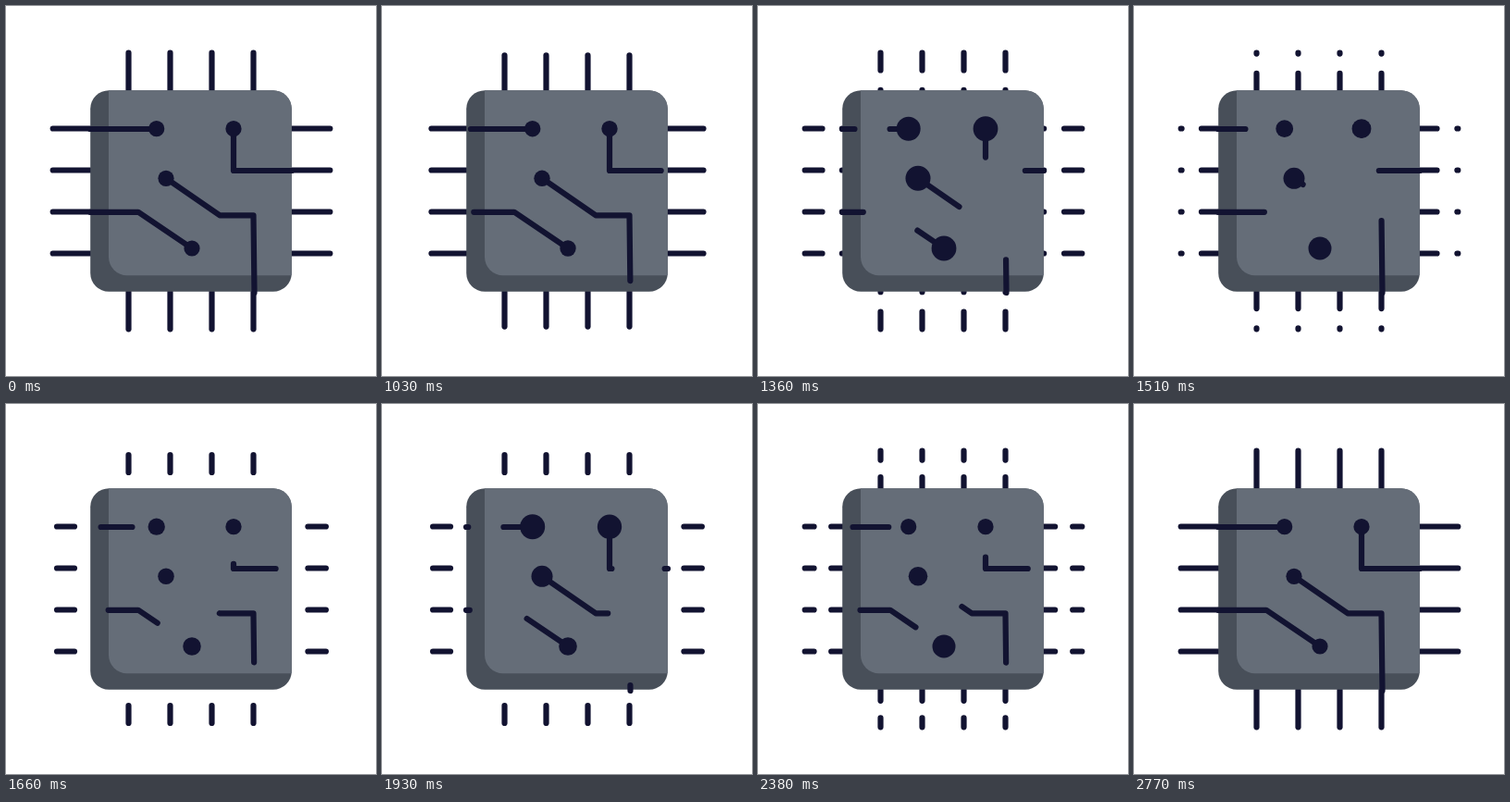
Write an HTML page that moves like this. It is 400 by 400 pixels and loops after 2.83 s.

```html
<!DOCTYPE html>
<html lang="en">
<head>
<meta charset="utf-8">
<title>Processor</title>
<style>
  html, body { margin: 0; width: 100%; height: 100%; overflow: hidden; background: #fff; }
  svg { display: block; width: 100%; height: 100%; }
  .wire { fill: none; stroke: #121331; stroke-width: 6.2; stroke-linecap: round; stroke-linejoin: round; }
  .dot { fill: #121331; }
</style>
</head>
<body>
<svg viewBox="0 0 400 400">
  <g id="pins"></g>
  <rect x="91.2" y="91.2" width="217.6" height="217.6" rx="20" fill="#484f59"/>
  <path d="M111 91.2H288.8a20 20 0 0 1 20 20V291.3H131a20 20 0 0 1-20-20Z" fill="#656d78"/>
  <g id="traces"></g>
  <g id="dots"></g>
</svg>
<script>
const LOOP = 2830, REST = 1000, STEP = 30;
const RUN_START = 7.8, RUN_END = 52.8, GAP = 0.53;

function add(parentId, tag, attrs) {
  const el = document.createElementNS('http://www.w3.org/2000/svg', tag);
  for (const name in attrs) el.setAttribute(name, attrs[name]);
  return document.getElementById(parentId).appendChild(el);
}
const wire = (parentId, d) => add(parentId, 'path', { d, class: 'wire', pathLength: 1 });

const pins = [132.5, 177.5, 222.5, 267.5].flatMap(p => [
  `M${p} 50.7V91`, `M${p} 349.3V309`, `M50.7 ${p}H91`, `M350.3 ${p}H309`
]).map(d => wire('pins', d));

const traces = [
  'M91 133H163',
  'M309 178H246V133',
  'M268.5 310L267.5 226.3H231L173 186.3',
  'M91 222.8H143L201 262'
].map(d => wire('traces', d));

// keys alternate small and large, in steps
const dots = [
  { x: 162.7, y: 132.7, keys: [0, 10, 19.5, 31, 45] },
  { x: 246, y: 132.7, keys: [0, 11, 21.3, 33, 46] },
  { x: 173, y: 186.3, keys: [0, 12, 23.3, 37, 52] },
  { x: 201, y: 262, keys: [0, 13, 26.3, 40.5, 59] }
].map(({ x, y, keys }) => ({ keys, el: add('dots', 'circle', { cx: x, cy: y, class: 'dot' }) }));

const clamp = v => Math.min(1, Math.max(0, v));

function pulse(keys, k) {
  const i = keys.findIndex((key, n) => k >= key && k < keys[n + 1]);
  if (i < 0) return 0;
  const ease = (1 - Math.cos(Math.PI * (k - keys[i]) / (keys[i + 1] - keys[i]))) / 2;
  return i % 2 ? 1 - ease : ease;
}

// Trimmed stroke that wraps from the end of the path to its start
function trim(el, turns, gap) {
  if (gap < 0.001) {
    el.style.strokeDasharray = 'none';
    return;
  }
  const front = turns % 1, tail = (turns + gap) % 1;
  const split = front > 0.001 && front < tail;
  const end = front > tail ? front : 1;
  el.style.strokeDasharray = split
    ? `${front} ${tail - front} ${1 - tail} 1`
    : `${end - tail} 2`;
  el.style.strokeDashoffset = split ? 0 : -tail;
}

function render(time) {
  const k = Math.max(0, Math.floor((time % LOOP - REST) / STEP));
  const run = clamp((k - RUN_START) / (RUN_END - RUN_START));
  const gap = GAP * Math.min(clamp(k / RUN_START), clamp((RUN_END - k) / RUN_START));
  pins.forEach(el => trim(el, run * 5, gap));
  traces.forEach(el => trim(el, run * 2, gap));
  dots.forEach(({ el, keys }) => el.setAttribute('r', 8.6 + 4.9 * pulse(keys, k)));
}

let start;
function tick(now) {
  start ??= now;
  render(now - start);
  requestAnimationFrame(tick);
}
render(0);
requestAnimationFrame(tick);
</script>
</body>
</html>
```
